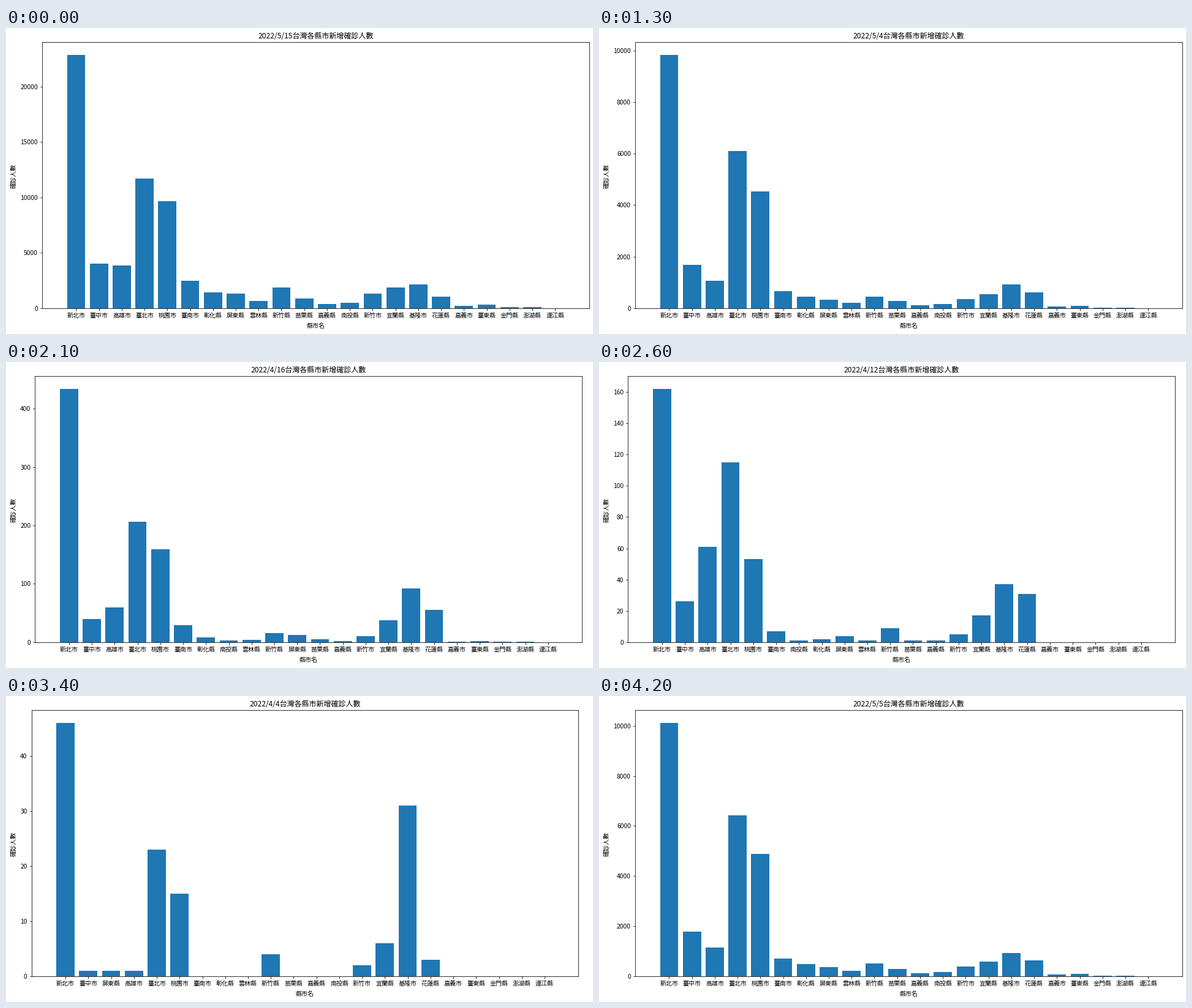
Write a matplotlib script that moves like this. It is 958 px wide and 500 px high and loops after 4.3 s.

```python
import numpy as np
import matplotlib.pyplot as plt
from matplotlib.animation import FuncAnimation

W, H, DPI = 958, 500, 72
AX_W, AX_H, AX_BOTTOM = 892.8, 434.88, 457.9

plt.rcParams["font.family"] = "Noto Sans CJK JP"
plt.rcParams["font.size"] = 10


def day(month, date):
    """Days since April 1."""
    return date - 1 + (30 if month == 5 else 0)


# The largest county sets the scale and grows exponentially between these days
LEADER = "新北市"
GROWTH = {day(4, 4): 46, day(4, 7): 120, day(4, 12): 162, day(4, 16): 434,
          day(4, 20): 822, day(4, 28): 4560, day(5, 4): 9830, day(5, 5): 10121,
          day(5, 15): 22882}

# Other counties in percent of the leader, spread evenly over KEY_DAYS
KEY_DAYS = [day(4, 4), day(4, 12), day(4, 16), day(4, 20), day(4, 28), day(5, 5), day(5, 15)]
PERCENT = {
    LEADER: (100, 100),
    "臺中市": (2.2, 16, 9.2, 9.2, 13.8, 17.6, 17.6),
    "高雄市": (2.2, 37.7, 13.8, 11.8, 7.5, 11.4, 16.9),
    "臺北市": (50, 71, 47.5, 57.5, 53.4, 63.5, 51.2),
    "桃園市": (32.6, 32.7, 36.6, 47.1, 32.6, 48.3, 42.2),
    "臺南市": (0, 6.7, 4.4, 10.9),
    "彰化縣": (0, 6.3),
    "屏東縣": (2.2, 2.8, 2.2, 5.8),
    "雲林縣": (0, 2.9),
    "新竹縣": (8.7, 3.7, 2.7, 8.2),
    "苗栗縣": (0, 3.9),
    "嘉義縣": (0, 1.7),
    "南投縣": (0, 2.2),
    "新竹市": (4.3, 2.3, 2.4, 5.8),
    "宜蘭縣": (13, 8.8, 3.9, 8.2),
    "基隆市": (67.4, 22.8, 21.2, 23.2, 11.1, 9.2, 9.4),
    "花蓮縣": (6.5, 19.1, 12.7, 10.6, 6.8, 6.3, 4.5),
    "嘉義市": (0, 0.9),
    "臺東縣": (0, 1.4),
    "金門縣": (0, 0.4),
    "澎湖縣": (0, 0.4),
    "連江縣": (0, 0),
}

# Days on which some counties stand elsewhere: (county, position)
MOVES = {
    day(4, 20): [("南投縣", 6), ("連江縣", 17)],
    day(4, 16): [("南投縣", 7), ("屏東縣", 10)],
    day(4, 12): [("南投縣", 6)],
    day(4, 4): [("屏東縣", 2)],
}


def countdown(month, first, last):
    return [(month, d) for d in range(first, last - 1, -1)]


DATES = (countdown(5, 15, 10) + countdown(4, 29, 24) + [(5, 4)] + countdown(4, 23, 15)
         + [(5, 3)] + countdown(4, 14, 1) + countdown(5, 9, 5))


def leader_cases(d):
    return np.exp(np.interp(d, list(GROWTH), np.log(list(GROWTH.values()))))


def cases(name, d):
    points = PERCENT[name]
    days = KEY_DAYS[::(len(KEY_DAYS) - 1) // (len(points) - 1)]
    return round(leader_cases(d) * np.interp(d, days, points) / 100)


def county_order(d):
    order = list(PERCENT)
    for name, place in MOVES.get(d, []):
        order.remove(name)
        order.insert(place, name)
    return order


fig = plt.figure(figsize=((W + 1e-6) / DPI, (H + 1e-6) / DPI), dpi=DPI, facecolor="white")
ax = fig.add_axes([0, 0, 1, 1])
x_label = fig.text(0.5, 1 - 486.7 / H, "縣市名", ha="center", va="center")
fig.text(13 / W, 1 - 241.5 / H, "確診人數", ha="center", va="center", rotation=90)


def draw(i):
    # The first date stays for two frames
    month, date = DATES[max(i - 1, 0)]
    d = day(month, date)
    names = county_order(d)

    ax.clear()
    ax.bar(names, [cases(n, d) for n in names], color="#1f77b4")
    ax.set_title(f"2022/{month}/{date}台灣各縣市新增確診人數", fontsize=12)
    ax.tick_params(axis="y", labelsize=10.2)

    # The plot moves right as the tick labels get longer
    top = ax.get_ylim()[1]
    digits = len(str(int(max(t for t in ax.get_yticks() if t <= top))))
    left = 58.94 - 5.76 * (5 - digits)
    ax.set_position([left / W, 1 - AX_BOTTOM / H, AX_W / W, AX_H / H])
    x_label.set_x((left + AX_W / 2) / W)


anim = FuncAnimation(fig, draw, frames=len(DATES) + 1, interval=100,
                     init_func=lambda: None, repeat=True, repeat_delay=0)
plt.show()
```
